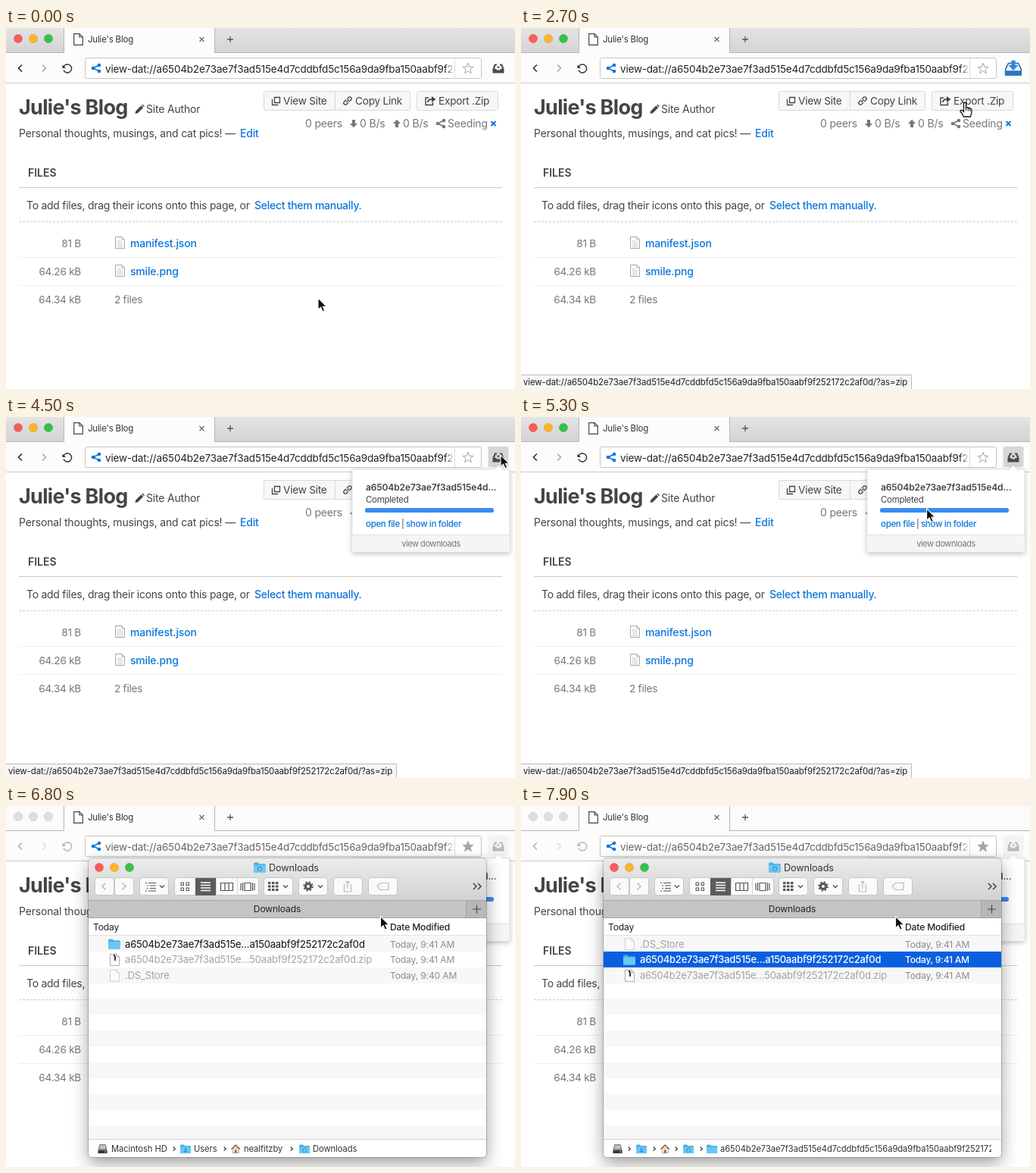
Recreate the animation shown at these times as an HTML page. Size 672 by 476 pixels, loop 8000 ms.

```html
<!DOCTYPE html>
<html lang="en">
<head>
<meta charset="utf-8">
<title>Blog archive export</title>
<style>
html, body { margin: 0; width: 100%; height: 100%; overflow: hidden; background: #fff; }
svg { display: block; width: 672px; height: 476px; font-family: Inter, "Open Sans", sans-serif; }
text { white-space: pre; fill: #444; }
.b { font-size: 14px; letter-spacing: -.18px; }
.b.hint { letter-spacing: -.27px; }
.g { fill: #777; }
.btn { font-size: 13.7px; letter-spacing: -.28px; }
.num { font-size: 13.6px; letter-spacing: -.25px; fill: #777; }
.link { font-weight: 500; fill: #0b76dc; }
.title { font-size: 27px; font-weight: 700; letter-spacing: -.7px; }
.head { font-size: 14px; font-weight: 600; }
.tab { font-size: 11.5px; letter-spacing: -.2px; fill: #333; }
.url { font-size: 13.5px; letter-spacing: -.19px; fill: #222; }
.stat { font-size: 11.5px; letter-spacing: -.14px; fill: #222; }
.pop { font-size: 11.5px; letter-spacing: -.32px; }
.popName { font-size: 12px; font-weight: 600; letter-spacing: -.12px; }
.foot { font-size: 11px; letter-spacing: -.45px; fill: #777; }
.win { font-size: 12.7px; letter-spacing: -.1px; fill: #333; }
.row { font-size: 13px; letter-spacing: -.17px; }
.date, .col { font-size: 12.1px; letter-spacing: -.15px; }
.col { fill: #222; }
.med { font-weight: 500; }
.path { font-size: 11.2px; letter-spacing: -.06px; fill: #333; }
.dim text { fill: #a3a3a3; }
.dim .date { fill: #8c8c8c; }
.fold text { fill: #111; }
.fold .date { fill: #8c8c8c; }
.sel text { fill: #fff; font-weight: 500; letter-spacing: -.25px; }
.off .url { fill: #666; }
.off .nav { opacity: .36; }
.off .tabs .light { fill: #dedede; stroke: #cfcfcf; }
.off .bar { fill: #fbfbfb; }
.off .star { fill: #a6a6a6; }
</style>
</head>
<body>
<svg id="stage" viewBox="0 0 672 476">
  <defs>
    <linearGradient id="chrome" x2="0" y2="1"><stop stop-color="#e4e4e4"/><stop offset="1" stop-color="#d3d3d3"/></linearGradient>
    <linearGradient id="metal" x2="0" y2="1"><stop stop-color="#ebebeb"/><stop offset="1" stop-color="#d2d2d2"/></linearGradient>
    <linearGradient id="fade"><stop stop-color="#fff" stop-opacity="0"/><stop offset="1" stop-color="#fff"/></linearGradient>
    <clipPath id="urlClip"><rect x="105" y="40" width="487" height="26"/></clipPath>
    <clipPath id="winClip"><rect x="109" y="69" width="525" height="394" rx="5"/></clipPath>
    <clipPath id="pathClip"><rect x="109" y="441" width="512" height="22"/></clipPath>
    <clipPath id="statClip"><rect id="statBox" y="456" width="517" height="20"/></clipPath>
    <filter id="soft" x="-20%" y="-20%" width="140%" height="150%"><feDropShadow dx="0" dy="2" stdDeviation="3" flood-opacity=".25"/></filter>
    <filter id="deep" x="-20%" y="-20%" width="140%" height="150%"><feDropShadow dx="0" dy="8" stdDeviation="11" flood-opacity=".38"/></filter>
  </defs>
</svg>
<script>
const LOOP = 8000, STEP = 100;
const ROW_TOP = 171, ROW_H = 20.9;
const HASH = 'a6504b2e73ae7f3ad515e4d7cddbfd5c156a9da9fba150aabf9f252172c2af0d';
const SITE = 'view-dat://' + HASH + '/';
const BLOG = "Julie's Blog", USER = 'nealfitzby';
const BLUE = '#0b76dc';

const text = (x, y, s, cls, attrs = '') => `<text x="${x}" y="${y}" class="${cls}" ${attrs}>${s}</text>`;
const rect = (x, y, w, h, fill, attrs = '') => `<rect x="${x}" y="${y}" width="${w}" height="${h}" fill="${fill}" ${attrs}/>`;
const fill = (d, c, attrs = '') => `<path d="${d}" fill="${c}" ${attrs}/>`;
const line = (d, c, w = 1, attrs = '') => `<path d="${d}" fill="none" stroke="${c}" stroke-width="${w}" ${attrs}/>`;
const group = (id, body, attrs = '') => `<g id="${id}" ${attrs}>${body}</g>`;
const at = (x, y, body) => `<g transform="translate(${x} ${y})">${body}</g>`;

const lights = (x, y) => ['#fc5b57', '#fdb429', '#34c247'].map((c, i) =>
  `<circle class="light" cx="${x + i * 20}" cy="${y}" r="5.7" fill="${c}" stroke="#0002" stroke-width=".7"/>`).join('');
const share = (x, y, c) => at(x, y, line('M4 -4L-4 0L4 4', c, 1.7) +
  [[4, -4], [-4, 0], [4, 4]].map(p => `<circle cx="${p[0]}" cy="${p[1]}" r="2.3" fill="${c}"/>`).join(''));
const page = (x, y, body = '') => at(x, y,
  fill('M.5 .5H9L12.5 4V15.5H.5Z', '#fff', 'stroke="#a8a8a8"') + line('M9 .5V4H12.5', '#a8a8a8') + body);
const folder = (x, y, s = 1, mark = '') => `<g transform="translate(${x} ${y}) scale(${s})">` +
  fill('M0 2Q0 0 1.5 0H5.5L7 1.8H14.5Q16 1.8 16 3.5V12Q16 13 15 13H1Q0 13 0 12Z', '#49b1ea') +
  rect(0, 3.6, 16, 9.4, '#6cc6f5', 'rx="1"') + mark + '</g>';
const downMark = '<circle cx="8" cy="8.2" r="3.2" fill="#3d9fd8"/>' + line('M8 6.5V9.8M6.6 8.5L8 9.9L9.4 8.5', '#d9f1ff', .9);
const userMark = '<circle cx="8" cy="6.8" r="1.5" fill="#2f8fc9"/>' + fill('M5 11.5Q5 8.8 8 8.8T11 11.5Z', '#2f8fc9');
const house = (x, y) => at(x, y, rect(2.2, 5, 8, 6.5, '#f3e6d3', 'stroke="#9c8a78" stroke-width=".7"') +
  fill('M0 6L6.2 0L12.4 6L11.4 7L6.2 2.2L1 7Z', '#9b5a41') + rect(5, 7.5, 2.6, 4, '#8a6a50'));
const disk = (x, y) => at(x, y, fill('M2.5 0H10.5L12.5 7V12H.5V7Z', '#8a8a8a') +
  rect(.5, 8, 12, 4, '#3a3a3a', 'rx="1"') + rect(3, 1.5, 7, 4.5, '#c4c4c4') + rect(9, 9.5, 2, 1.2, '#8d8'));
const chev = (x, y) => line(`M${x - 1.3} ${y - 2.5}L${x + 1.3} ${y}L${x - 1.3} ${y + 2.5}`, '#444', 1.4);
const drop = (x, y) => line(`M${x - 3} ${y - 1.5}L${x} ${y + 1.5}L${x + 3} ${y - 1.5}`, '#555', 1.4);
const arrow = c => fill('M-2 -5H2V0H5L0 5.3L-5 0H-2Z', c);

function browser() {
  let s = '<g class="tabs">' + rect(0, 0, 672, 33, 'url(#chrome)', 'class="bar"') + lights(16, 14) + '</g>';
  s += rect(0, 33, 672, 40, '#fcfcfc') + line('M0 32.5H76.5V0M275.5 0V32.5H672', '#b5b5b5');
  s += rect(77, 0, 198, 34, '#fcfcfc') + line('M0 72.5H672', '#c9c9c9');
  s += at(89, 7, fill('M.7 .7H8L12.3 5V15.3H.7Z', '#fff', 'stroke="#444" stroke-width="1.2"') + line('M8 .7V5H12.3', '#444', 1.2));
  s += text(108, 19, BLOG, 'tab');
  s += line('M255.5 12L261.5 18M261.5 12L255.5 18', '#666', 1.2) + line('M292 15H300M296 11V19', '#555', 1.3);
  s += '<g class="nav">' + line('M21 48.5L16.5 53L21 57.5', '#333', 1.7) + line('M48 48.5L52.5 53L48 57.5', '#aaa', 1.7) +
    line('M76.2 51A5.5 5.5 0 1 1 76 55.5', '#333', 1.5) + fill('M74.5 48.5V53H79Z', '#333') + '</g>';
  s += rect(104.5, 39.5, 523, 27, '#fff', 'stroke="#c6c6c6" rx="2"') + share(119, 53, BLUE);
  s += `<g clip-path="url(#urlClip)">${text(131, 58.5, SITE, 'url')}</g>` + rect(580, 42, 12, 23, 'url(#fade)');
  s += line('M592.5 40V66', '#ddd');
  const star = Array.from({ length: 10 }, (_, i) => {
    const r = i % 2 ? 3 : 7.4, a = i * Math.PI / 5;
    return `${(610 + r * Math.sin(a)).toFixed(1)} ${(53.7 - r * Math.cos(a)).toFixed(1)}`;
  });
  s += `<path d="M${star.join('L')}Z" class="star" fill="#fff" stroke="#a6a6a6"/>`;
  s += rect(636.5, 39, 27, 27, '#ddd', 'id="hover" rx="2"');
  const tray = 'M-7.5 6.5V1L-5 -5.5H-2V-3.5H-3.6L-5 1H-2.4V2.6H2.4V1H5L3.6 -3.5H2V-5.5H5L7.5 1V6.5Z';
  s += group('tray', group('trayDark', fill(tray, '#4a4a4a') + fill('M-2.2 -2.2H2.2L0 .6Z', '#4a4a4a')) + group('trayBlue',
    fill('M-8 7V1L-5 -5H5L8 1V7Z', '#e9f2fc', 'stroke="#2c6db5" stroke-width="1.2"') +
    rect(-8, 2.6, 16, 5, '#2f75c0', 'rx="1"') + fill('M-2 -8H2V-3H5L0 2.3L-5 -3H-2Z', '#2f86e0')));
  return s;
}

function site() {
  let s = text(17, 114, BLOG, 'title');
  s += fill('M170.5 113L171.3 109.5L178.5 102.3L181.2 105L174 112.2ZM179.3 101.5L180.3 100.5L183 103.2L182 104.2Z', '#444');
  s += text(185, 112, 'Site Author', 'b');
  s += text(17, 144, 'Personal thoughts, musings, and cat pics! —', 'b') + text(309, 144, 'Edit', 'b link');
  const box = 'stroke="#d9d9d9" rx="2"';
  s += rect(340.5, 83.5, 193, 25, '#f7f7f7', box) + line('M434.5 84V108', '#d9d9d9') + rect(542.5, 83.5, 107, 25, '#f7f7f7', box);
  s += line('M354.5 91.5H361.5V98.5H354.5ZM352 94.5H351.5V101.5H358.5V101', '#444', 1.3);
  s += `<g transform="translate(451 96) rotate(-45)">` + line('M-.5 -2.3H-4A2.3 2.3 0 0 0 -4 2.3H-1M.5 2.3H4A2.3 2.3 0 0 0 4 -2.3H1M-2.5 0H2.5', '#444', 1.3) + '</g>';
  s += line('M558 92H554V101.5H563.5V98', '#444', 1.4) + line('M557 98Q557 93.8 563 93.8', '#444', 1.8) + fill('M562 90L567.5 94L562 98Z', '#444');
  s += text(366, 101, 'View Site', 'btn') + text(461, 101, 'Copy Link', 'btn') + text(571, 101, 'Export .Zip', 'btn');
  s += text(395, 131, '0 peers', 'b g') + text(467, 131, '0 B/s', 'b g') + text(524, 131, '0 B/s', 'b g') + text(583, 131, 'Seeding', 'b g');
  s += at(459, 126, arrow('#777')) + `<g transform="translate(516 126) scale(1 -1)">${arrow('#777')}</g>` + share(574, 126, '#777');
  s += line('M640.5 123L646.5 129M646.5 123L640.5 129', BLUE, 2);
  s += text(29, 196, 'FILES', 'head') + line('M17 210.5H655', '#c8c8c8');
  s += text(27, 239, 'To add files, drag their icons onto this page, or', 'b hint') + text(328, 239, 'Select them manually.', 'b hint link');
  s += line('M17 255.5H655', '#ccc', 1, 'stroke-dasharray="3 2"') + line('M17 302.5H655M17 339.5H655', '#eee');
  const rules = line('M3 5.5H8M3 7.5H10M3 9.5H10M3 11.5H10M3 13.5H10', '#c4c4c4', .8);
  [['81 B', 'manifest.json'], ['64.26 kB', 'smile.png'], ['64.34 kB']].forEach(([size, name], i) => {
    const y = 289 + 37 * i;
    s += text(99, y, size, 'num', 'text-anchor="end"');
    s += name ? page(144, y - 14, rules) + text(164, y, name, 'b link') : text(143, y, '2 files', 'num');
  });
  return s;
}

function popup() {
  return `<g filter="url(#soft)">` + fill('M459 69H645L650 63.5L655 69H663Q665 69 665 71V178H457V71Q457 69 459 69Z', '#fff', 'stroke="#ccc" stroke-width=".6"') + '</g>' +
    text(475, 97, HASH.slice(0, 23) + '...', 'popName') + text(475, 113, 'Completed', 'pop') +
    rect(474, 120, 170, 6, '#378df2', 'rx="2.5"') +
    text(475, 145, 'open file', 'pop link', 'id="open"') + text(522, 145, '|', 'pop') + text(528, 145, 'show in folder', 'pop link') +
    rect(457, 155, 208, 23, '#f5f5f5') + line('M457 155.5H665', '#ddd') + text(561, 171, 'view downloads', 'foot', 'text-anchor="middle"');
}

function toolbar() {
  const btn = (x, w) => rect(x + .5, 94.5, w, 23, '#fafafa', 'rx="3.5" stroke="#c6c6c6"');
  let s = [[117, 25], [143, 25], [176, 38], [222, 111], [340, 38], [386, 38], [432, 38], [478, 38]].map(b => btn(...b)).join('');
  s += line('M131.5 101.5L127 106L131.5 110.5M153.5 101.5L158 106L153.5 110.5', '#bbb', 1.5);
  s += line('M184 101.5H186M188 101.5H198M186 105H188M190 105H198M186 108.5H188M190 108.5H198M184 112H186M188 112H198', '#555', 1.2) + drop(206, 106);
  s += rect(250, 95, 27, 23, '#5c5c5c') + line('M277.5 95V118M305.5 95V118', '#d5d5d5');
  for (const [x, y] of [[231, 101], [238, 101], [231, 108], [238, 108]]) s += rect(x, y, 3.5, 3.5, 'none', 'stroke="#555"');
  s += line('M257 101H270M257 104.5H270M257 108H270M257 111.5H270', '#fff', 1.4);
  s += line('M283.5 101.5H299.5V111.5H283.5ZM289 101V112M294 101V112', '#555', 1.2);
  s += line('M315 101.5H323V111.5H315ZM312.5 101V112M325.5 101V112M310 102V111M328 102V111', '#555', 1.2);
  for (let i = 0; i < 9; i++) s += rect(346 + i % 3 * 5, 100 + (i / 3 | 0) * 4.5, 3.5, 3, '#555');
  s += drop(369, 106) + `<circle cx="399" cy="106" r="3.6" fill="none" stroke="#555" stroke-width="3"/>` +
    `<circle cx="399" cy="106" r="5.7" fill="none" stroke="#555" stroke-width="2" stroke-dasharray="2.2 2.277"/>` + drop(415, 106);
  s += line('M448 104H446.5V113H455.5V104H454M451 109V99M448.5 101.5L451 99L453.5 101.5', '#bbb', 1.2);
  s += line('M490 106L494 101.5H505V110.5H494ZM494.5 106H495.5', '#bbb', 1.2);
  return s + line('M617 102L621 106L617 110M623 102L627 106L623 110', '#444', 1.5);
}

function fileRow(id, icon, name, cls) {
  return group(id, icon + text(157, 15.5, name, 'row') + text(507, 15.5, 'Today, 9:41 AM', 'date'), `class="${cls}"`);
}

function fileWindow() {
  let s = rect(109, 69, 525, 55, 'url(#metal)') + lights(123, 81) + folder(327, 74.5, 1, downMark) + text(347, 86, 'Downloads', 'win') + toolbar();
  s += rect(109, 124, 525, 24, '#c4c4c4') + rect(607, 124, 27, 24, '#b7b7b7') + line('M109 124.5H634M109 147.5H634M607.5 124V148', '#a5a5a5');
  s += text(358, 140, 'Downloads', 'col', 'text-anchor="middle"') + line('M616 136H627M621.5 130.5V141.5', '#444', 1.2);
  s += rect(109, 148, 525, 315, '#fff') + text(115, 163.5, 'Today', 'col') + text(507, 163.5, 'Date Modified', 'col med') + line('M109 170.5H634', '#e2e2e2') + line('M500.5 151V168', '#ddd');
  for (let i = 0; i < 13; i += 2) s += rect(109, ROW_TOP + i * ROW_H, 525, ROW_H, '#f7f7f7');
  s += rect(109, ROW_TOP, 525, ROW_H, '#0a5fe0', 'id="pick"');
  const head = HASH.slice(0, 21) + '…';
  s += fileRow('fold', folder(135, 4.5), head + HASH.slice(-22), 'fold');
  s += fileRow('zip', page(137, 3, rect(5, 1, 2, 2.5, '#333') + rect(6, 3, 2, 6, '#333')), head + HASH.slice(-20) + '.zip', 'dim');
  s += fileRow('store', `<g opacity=".5">${page(137, 3)}</g>`, '.DS_Store', 'dim');
  s += rect(109, 440, 525, 23, '#fff') + line('M109 439.5H634', '#d0d0d0');
  s += group('pathA', disk(121, 446) + text(139, 456, 'Macintosh HD', 'path') + chev(222, 452) + folder(230, 446.5, .88, userMark) +
    text(248, 456, 'Users', 'path') + chev(289, 452) + house(297, 446) + text(314, 456, USER, 'path') + chev(377, 452) +
    folder(387, 446.5, .88, downMark) + text(405, 456, 'Downloads', 'path'));
  s += group('pathB', disk(121, 446) + folder(152, 446.5, .88, userMark) + house(184, 446) + folder(214, 446.5, .88, downMark) + folder(245, 446.5, .88) +
    [143, 176, 205, 238].map(x => chev(x, 452)).join('') + text(263, 456, HASH, 'path'), 'clip-path="url(#pathClip)"');
  return `<g filter="url(#deep)">${rect(109, 69, 525, 394, '#fff', 'rx="5"')}</g><g clip-path="url(#winClip)">${s}</g>` +
    rect(108.5, 68.5, 526, 395, 'none', 'rx="5.5" stroke="#0003"');
}

const stage = document.getElementById('stage');
stage.insertAdjacentHTML('beforeend', rect(0, 0, 672, 476, '#fff') + browser() + site() +
  group('status', rect(-1, 457.5, 516.5, 20, '#f6f6f6', 'stroke="#bbb"') + text(3, 470.5, SITE + '?as=zip', 'stat'), 'clip-path="url(#statClip)"') +
  group('popup', popup()) + group('files', fileWindow()) +
  group('pointer', fill('M0 0V15.5L3.5 12.2L6 17.8L8.8 16.6L6.3 11.2H11Z', '#111', 'stroke="#fff" stroke-width="1.1"')) +
  group('hand', fill('M-1.5 0Q0 -1.5 1.5 0V6Q3.5 5 4.2 6.5Q6 5.8 6.7 7.3Q8.8 7 9 9V12Q8.5 15 7.3 18H-1.5Q-3 14.5 -6 11Q-6 9 -4 9.3L-1.5 11.3Z', '#fff', 'stroke="#111" stroke-width="1.3"') +
    line('M1.6 6V10M4.3 7V10.5M6.8 8V11', '#111')));

const $ = id => document.getElementById(id);
const show = (id, on) => $(id).setAttribute('display', on ? 'inline' : 'none');
const move = (id, x, y, more = '') => $(id).setAttribute('transform', `translate(${x} ${y})${more}`);
const clamp = v => Math.max(0, Math.min(1, v));
const ease = v => v * v * (3 - 2 * v);

// start, end, x, y of each pointer move
const START = [412, 356];
const MOVES = [[1000, 1800, 586, 99], [3100, 3800, 653, 50], [4600, 5650, 494.5, 145.5]];

function pointerAt(t) {
  let [x, y] = START;
  for (const [from, to, tx, ty] of MOVES) {
    const k = ease(clamp((t - from) / (to - from)));
    x += (tx - x) * k;
    y += (ty - y) * k;
  }
  return [x, y];
}

function draw(t) {
  const [x, y] = pointerAt(t);
  const inside = (l, r, top, bottom) => x > l && x < r && y > top && y < bottom;
  const off = t >= 6500, opened = t >= 4300, sorted = t >= 7700, picked = t >= 7400;
  const onLink = inside(542, 650, 83, 109);

  move('pointer', x, y);
  move('hand', x, y);
  show('pointer', !onLink);
  show('hand', onLink);

  stage.classList.toggle('off', off);
  const busy = t >= 2200 && t < 3100;
  const pulse = busy ? 1 + .3 * Math.sin(Math.PI * clamp((t - 2200) / 900)) : 1;
  move('tray', 650, 53, ` scale(${pulse})`);
  $('tray').setAttribute('opacity', off ? .35 : 1);
  show('trayDark', !busy);
  show('trayBlue', busy);
  show('hover', opened || inside(637, 664, 39, 67));
  $('hover').setAttribute('fill', off ? '#f3f3f3' : opened ? '#d6d6d6' : '#e6e6e6');

  show('status', t >= 1700 && t < 6800);
  $('statBox').setAttribute('width', off ? 52 : 517);
  show('popup', opened);
  $('open').setAttribute('text-decoration', inside(474, 520, 134, 149) ? 'underline' : 'none');

  show('files', t >= 6800);
  const rowY = row => ROW_TOP + row * ROW_H;
  move('fold', 0, rowY(sorted ? 1 : 0));
  move('zip', 0, rowY(sorted ? 2 : 1));
  move('store', 0, rowY(sorted ? 0 : 2));
  $('store').querySelector('.date').textContent = `Today, 9:4${sorted ? 1 : 0} AM`;
  $('fold').setAttribute('class', picked ? 'sel' : 'fold');
  $('pick').setAttribute('y', rowY(sorted ? 1 : 0));
  show('pick', picked);
  show('pathA', !picked);
  show('pathB', picked);
}

const origin = performance.now();
function tick() {
  const t = (performance.now() - origin) % LOOP;
  draw(Math.floor(t / STEP) * STEP);
  requestAnimationFrame(tick);
}
tick();
</script>
</body>
</html>
```
